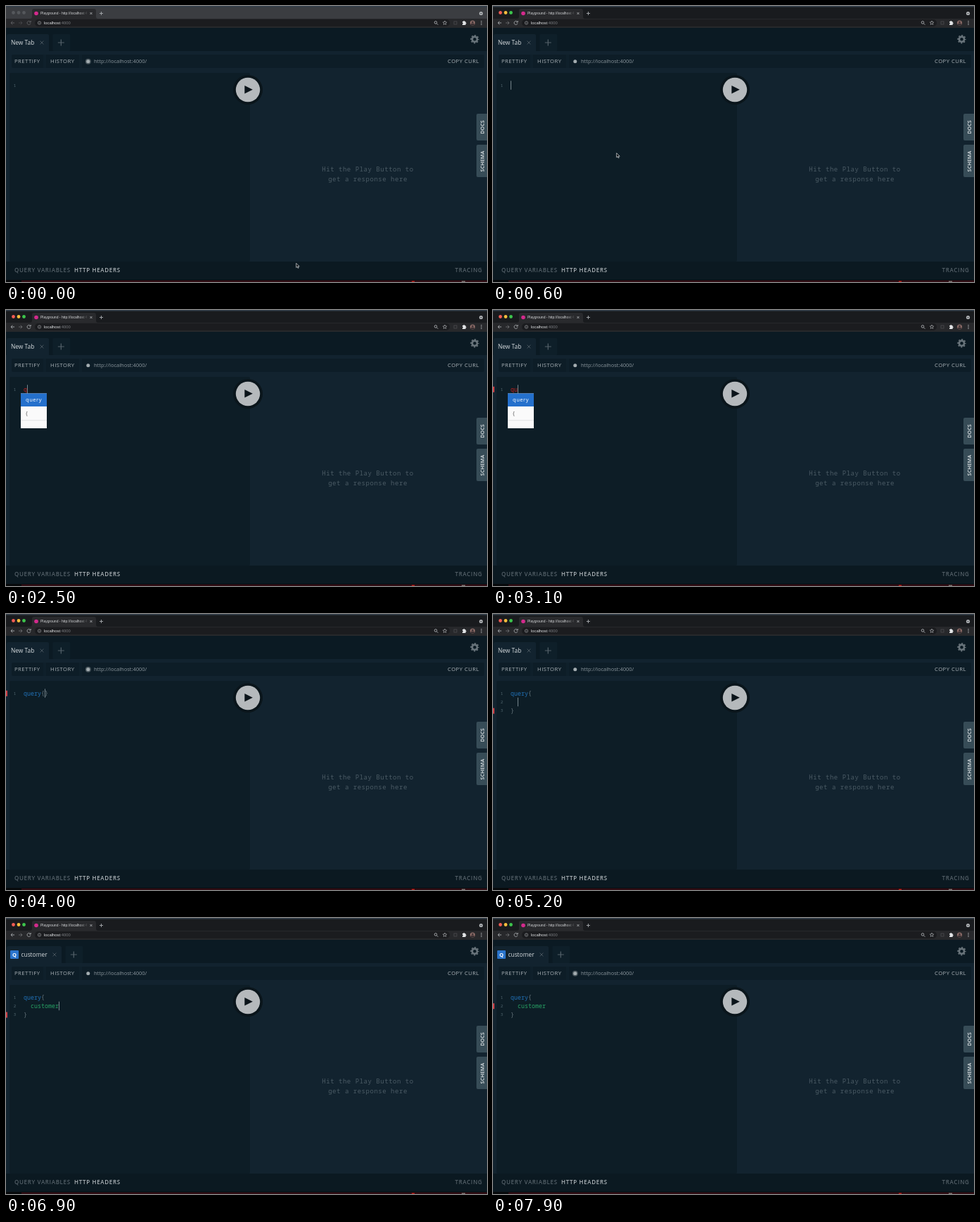
An HTML page for the animation above (8000 ms loop, 684 by 392 pixels).

```html
<!DOCTYPE html>
<html lang="en">
<head>
<meta charset="utf-8">
<title>Query editor</title>
<style>
  html, body { margin: 0; width: 100%; height: 100%; overflow: hidden; background: #07090b; }
  svg { display: block; width: 684px; height: 392px; }
  text { white-space: pre; }
  .ui { font: 500 7.7px "Open Sans", sans-serif; letter-spacing: .47px; fill: #abb3b8; }
  .foot { font: 600 8px "Open Sans", sans-serif; letter-spacing: .66px; fill: #56626a; }
  .side { font: 600 7px "Open Sans", sans-serif; letter-spacing: .2px; fill: #e4e9eb; text-anchor: middle; }
  .tab { font: 8.4px "Open Sans", sans-serif; fill: #d6dbde; }
  .url { font: 7.5px "Open Sans", sans-serif; fill: #8c979e; }
  .chrome { font: 5.04px "Liberation Sans", Arial, sans-serif; fill: #e4e6e8; }
  .code { font: 8.33px "Noto Sans Mono", monospace; fill: #66757c; }
  .hint { font: 9px "Noto Sans Mono", monospace; letter-spacing: .53px; fill: #4b5b65; text-anchor: middle; }
  .num { font: 5.8px "Noto Sans Mono", monospace; fill: #536870; }
  .item { font: 7.6px "Open Sans", sans-serif; letter-spacing: .5px; fill: #555; }
  .line { fill: none; stroke: #a9acaf; stroke-width: .9; }
  .key { fill: #2170b5; }
  .field { fill: #28a265; }
  .bad { fill: #c3201d; }
</style>
</head>
<body>
<svg viewBox="0 0 684 392">
  <defs>
    <linearGradient id="fade" gradientUnits="userSpaceOnUse" x1="104" x2="117">
      <stop stop-color="#d4d6d8"/><stop offset="1" stop-color="#d4d6d8" stop-opacity="0"/>
    </linearGradient>
  </defs>

  <!-- browser frame -->
  <rect width="684" height="392" fill="#07090b"/>
  <rect id="strip" y="1" width="684" height="18"/>
  <rect width="684" height="1.5" fill="#333f4b"/>
  <path d="M34 18Q37 18 37 15V7Q37 4 40 4H125Q128 4 128 7V15Q128 18 131 18Z" fill="#292a2d"/>
  <rect y="18" width="684" height="13" fill="#27282b"/>
  <rect x="41" y="19" width="590" height="10" rx="5" fill="#1b1c1f"/>
  <g id="lights"><circle cx="10.5" cy="9.5" r="2.4"/><circle cx="18" cy="9.5" r="2.4"/><circle cx="25.5" cy="9.5" r="2.4"/></g>
  <circle cx="43" cy="10.5" r="2.8" fill="#d42a8d"/>
  <text class="chrome" x="49" y="12.3" style="fill:url(#fade)">Playground - http://localhost:4</text>
  <path class="line" d="M119.5 9l3 3m0-3l-3 3M133 10.5h5m-2.5-2.5v5"/>
  <g id="nav" class="line">
    <path d="M12 24H7m2.3-2.3L7 24l2.3 2.3"/>
    <path d="M18 24h5m-2.3-2.3L23 24l-2.3 2.3" opacity=".5"/>
    <path d="M34.6 22.5A2.5 2.5 0 1 0 35 24.6M35.2 21v2h-2"/>
  </g>
  <g class="line">
    <circle cx="47.5" cy="24" r="2.2" stroke-width=".6"/><path d="M47.5 23.6v1.6m0-2.7v.5" stroke-width=".6"/>
    <circle cx="611" cy="23.4" r="1.8"/><path d="M612.4 24.8l2 2"/>
    <path d="M624 21l.8 1.9 2 .2-1.5 1.3.5 2-1.8-1.1-1.8 1.1.5-2-1.5-1.3 2-.2z" stroke-width=".7"/>
    <rect x="637" y="22" width="4" height="4" opacity=".25"/>
  </g>
  <path d="M649 22h1.3a1 1 0 0 1 2 0h1.3v1.5a1 1 0 0 1 0 2V27H649v-1.6a1 1 0 0 0 0-2z" fill="#e2e4e6"/>
  <circle cx="663.5" cy="24" r="3.6" fill="#8a6a66"/>
  <path d="M660.4 25.8a3.6 3.6 0 0 0 6.2 0q-3.1-2.4-6.2 0z" fill="#3a3033"/><circle cx="663.5" cy="23" r="1.3" fill="#3a3033"/>
  <g fill="#b9bcbf"><circle cx="676" cy="21.7" r=".7"/><circle cx="676" cy="24" r=".7"/><circle cx="676" cy="26.3" r=".7"/></g>
  <circle cx="675.5" cy="10.5" r="2.6" fill="#b0b3b6"/><path d="M674.3 10l1.2 1.3 1.2-1.3" fill="none" stroke="#191b1e" stroke-width=".7"/>
  <text class="chrome" x="54" y="26" style="font-size:5.85px">localhost<tspan fill="#7c7f83">:4000</tspan></text>

  <!-- page -->
  <rect y="31" width="684" height="358" fill="#12232f"/>
  <rect y="31" width="684" height="33" fill="#0b1a23"/>
  <path id="tabBox" fill="#12232f"/>
  <g id="badge"><rect x="6" y="46" width="12" height="12" rx="1" fill="#2a74cc"/>
    <text x="12" y="54.8" text-anchor="middle" style="font:700 7.5px 'Open Sans',sans-serif" fill="#fff">Q</text></g>
  <text class="tab" id="tabName" y="55"></text>
  <path class="line" id="tabClose" d="M-2.4 49.6l4.8 4.8m0-4.8l-4.8 4.8" style="stroke:#4d5a62"/>
  <g id="tabAdd"><rect x="-12" y="40" width="25" height="24" rx="1" fill="#0e1f29"/>
    <path d="M-4.5 52h9M0 47.5v9" stroke="#55626a" stroke-width="1.2"/></g>
  <g transform="translate(666.5 47.2)" fill="none" stroke="#69747b">
    <circle r="3.6" stroke-width="2.6"/><circle r="5.4" stroke-width="1.6" stroke-dasharray="2.12 2.12" stroke-dashoffset="1.06"/>
  </g>

  <rect x="8" y="69" width="672" height="19" rx="2" fill="#0d1d27"/>
  <g fill="#12232f" opacity=".5">
    <rect x="53" y="69" width="4" height="19"/><rect x="104" y="69" width="4" height="19"/>
  </g>
  <text class="ui" x="12" y="81.3">PRETTIFY</text>
  <text class="ui" x="63" y="81.3">HISTORY</text>
  <text class="ui" x="628" y="81.3">COPY CURL</text>
  <circle id="pulse" cx="116.8" cy="78.7" r="4" fill="#48555c"/>
  <circle cx="116.8" cy="78.7" r="2.5" fill="#a4adb1"/>
  <text class="url" x="125" y="81.3">http://localhost:4000/</text>

  <rect x="5" y="95" width="342" height="268" rx="2" fill="#0d1d26"/>
  <text class="hint" x="514.5" y="235.3">Hit the Play Button to</text>
  <text class="hint" x="514.5" y="248.8">get a response here</text>
  <circle cx="344" cy="119" r="21" fill="#0a151b"/>
  <circle cx="344" cy="119" r="17.2" fill="#b5b9bc"/>
  <path d="M339.3 113L350.8 118.8l-11.5 5.8z" fill="#0b141a"/>

  <path d="M684 153H671q-2 0-2 2v34q0 2 2 2h13zM684 197H671q-2 0-2 2v42q0 2 2 2h13z" fill="#374c57"/>
  <text class="side" transform="translate(679.5 172) rotate(-90)">DOCS</text>
  <text class="side" transform="translate(679.5 220.5) rotate(-90)">SCHEMA</text>

  <rect y="363" width="684" height="26" fill="#0b1921"/>
  <text class="foot" x="12" y="378.3">QUERY VARIABLES</text>
  <text class="foot" x="97" y="378.3" style="fill:#aeb5b9">HTTP HEADERS</text>
  <text class="foot" x="677.6" y="378.3" text-anchor="end">TRACING</text>
  <rect x="22" y="390" width="662" height="1.5" fill="#421019"/>
  <rect x="577" y="390.5" width="4" height="1.5" fill="#b3231c"/>
  <rect x="648" y="390.5" width="5" height="1.5" fill="#77706e"/>

  <!-- editor -->
  <g id="code"></g>
  <rect id="lint" width="2" height="8" fill="#d23f45"/>
  <rect id="caret" width="1" height="12.5" fill="#75848b"/>
  <g id="menu"></g>
  <path id="mouse" d="M0 0V6.2L1.5 4.9 2.5 7.1 3.5 6.7 2.5 4.5H4.5Z" fill="#0b0d0f" stroke="#dfe3e5" stroke-width=".7"/>
</svg>

<script>
const LOOP = 8000, BLINK = 530, PULSE = 1320, FOCUS = 500, TYPING = 2500;
const $ = id => document.getElementById(id);
const show = (id, on) => $(id).style.display = on ? '' : 'none';
const lineY = n => 112.8 + 12.4 * n;
const span = (kind, s) => `<tspan class="${kind}">${s}</tspan>`;
const latest = (list, t) => list.filter(e => e.at <= t).pop();

const open = span('key', 'query') + '{';
const body = word => [open, '  ' + span('field', word), '}'];
const start = { x: 21, y: 118.5, w: 37, rows: ['query', '{', ''], tops: [0, 18.5, 38, 49.5] };
const fields = { x: 31, y: 131, w: 60, rows: ['customer', 'accounts', 'Customer!'], tops: [0, 19, 38.5, 60] };

// caret is [column, line]
const edits = [
  { at: 0, lines: [''] },
  { at: FOCUS, lines: [''], caret: [0, 0] },
  { at: TYPING, lines: [span('bad', 'q')], caret: [1, 0], menu: start },
  { at: 2800, lines: [span('bad', 'qu')], caret: [2, 0], menu: start },
  { at: 3500, lines: [span('key', 'query')], caret: [5, 0] },
  { at: 3850, lines: [open + '}'], caret: [6, 0] },
  { at: 4130, lines: body(''), caret: [2, 1] },
  { at: 5600, lines: body('c'), caret: [3, 1], menu: fields },
  { at: 5850, lines: body('cu'), caret: [4, 1], menu: fields },
  { at: 6900, lines: body('customer'), caret: [10, 1] }
];
const tabs = [
  { at: 0, name: 'New Tab', w: 61 },
  { at: 5600, name: 'c', w: 45 },
  { at: 6000, name: 'cu', w: 50 },
  { at: 6900, name: 'customer', w: 79 }
];
const lints = [
  { at: 0, line: -1 }, { at: 2900, line: 0 }, { at: 4400, line: 2 }, { at: 7300, line: 1 }
];

function drawMenu(m) {
  if (!m) return '';
  const h = m.tops[3];
  return `<rect x="${m.x}" y="${m.y}" width="${m.w}" height="${h}" fill="#fafafa"/>
    <rect x="${m.x}" y="${m.y}" width="${m.w}" height="${m.tops[1]}" fill="#2470cc"/>
    <rect x="${m.x}" y="${m.y + m.tops[2]}" width="${m.w}" height=".7" fill="#d8dadc"/>` +
    m.rows.map((s, i) => {
      const y = m.y + (m.tops[i] + m.tops[i + 1]) / 2 + 2.7;
      const fill = ['#fff', '#555', '#e0962a'][i];
      return `<text class="item" x="${m.x + 7}" y="${y}" style="fill:${fill}">${s}</text>`;
    }).join('');
}

function drawCode(lines) {
  return lines.map((s, i) => {
    const y = lineY(i) + 3.2;
    return `<text class="num" x="10.7" y="${y - 1.5}">${i + 1}</text>
      <text class="code" x="25" y="${y}">${s}</text>`;
  }).join('');
}

function drawTab({ name, w }) {
  const fresh = name === 'New Tab';
  show('badge', !fresh);
  $('tabName').textContent = name;
  $('tabName').setAttribute('x', fresh ? 7 : 21.5);
  $('tabBox').setAttribute('d', `M1 64V42q0-2 2-2H${w - 2}q2 0 2 2V64z`);
  $('tabClose').setAttribute('transform', `translate(${w - 10} 0)`);
  $('tabAdd').setAttribute('transform', `translate(${w + 17.3} 0)`);
}

let lastEdit, lastTab;
function draw(t) {
  const edit = latest(edits, t), tab = latest(tabs, t), { line } = latest(lints, t);
  if (edit !== lastEdit) {
    $('code').innerHTML = drawCode(edit.lines);
    $('menu').innerHTML = drawMenu(edit.menu);
    lastEdit = edit;
  }
  if (tab !== lastTab) drawTab(lastTab = tab);

  show('caret', edit.caret && Math.floor((t - edit.at) / BLINK) % 2 === 0);
  if (edit.caret) {
    const [col, row] = edit.caret;
    $('caret').setAttribute('x', 25 + 5 * col);
    $('caret').setAttribute('y', lineY(row) - 6.5);
  }
  show('lint', line >= 0);
  $('lint').setAttribute('y', lineY(line) - 4);
  show('pulse', (t + 70) % PULSE < 220);

  const focused = t >= FOCUS;
  $('strip').setAttribute('fill', focused ? '#191b1e' : '#3b3d41');
  [...$('lights').children].forEach((c, i) =>
    c.setAttribute('fill', focused ? ['#f25c54', '#f5bd3d', '#3dc64c'][i] : '#55585c'));
  $('nav').setAttribute('opacity', focused ? 1 : .45);

  const p = Math.min(t / 450, 1), ease = p * p * (3 - 2 * p);
  show('mouse', t < TYPING);
  $('mouse').setAttribute('transform', `translate(${412.7 - 237 * ease} ${365.3 - 156.5 * ease})`);
}

function tick() {
  draw(performance.now() % LOOP);
  requestAnimationFrame(tick);
}
tick();
</script>
</body>
</html>
```
